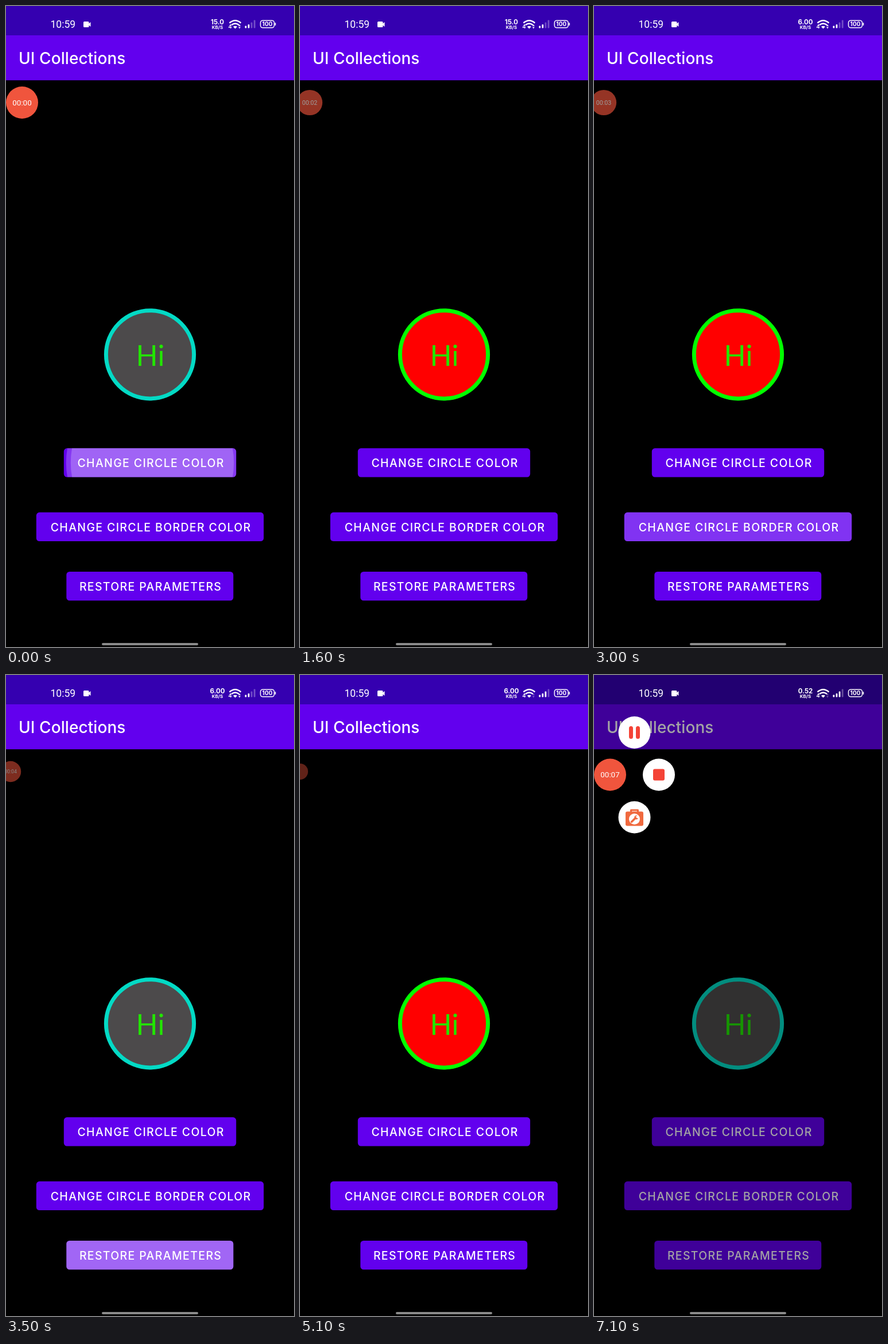
Write an HTML page that moves like this. It is 502 px wide and 1115 px high and loops after 7.2 s.

```html
<!DOCTYPE html>
<html lang="en">
<head>
<meta charset="utf-8">
<title>UI Collections</title>
<style>
  html, body { margin: 0; width: 100%; height: 100%; overflow: hidden; background: #000; }
  svg { display: block; width: 100%; height: 100%; }
  text { fill: #fff; font-family: Roboto, sans-serif; }
  .mid { text-anchor: middle; }
  .title { font: 500 28px Inter, sans-serif; letter-spacing: .08px; }
  .label { font: 500 19.5px Inter, sans-serif; letter-spacing: 1.35px; text-anchor: middle; }
  .hi { font: 400 50px Lato, sans-serif; fill: #22e600; text-anchor: middle; }
  .bold { font-family: Inter, sans-serif; font-weight: 700; text-anchor: middle; }
  .line { fill: none; stroke: #fff; }
</style>
</head>
<body>
<svg viewBox="0 0 502 1115">
  <rect width="502" height="1115"/>
  <rect width="502" height="51" fill="#3500b0"/>
  <rect y="51" width="502" height="78.2" fill="#6200ee"/>
  <text class="title" x="22" y="101">UI Collections</text>

  <circle id="disc" cx="251" cy="606.3" r="76.6" stroke-width="7"/>
  <text class="hi" x="251.5" y="626">Hi</text>
  <g id="buttons"></g>

  <rect id="dim" width="502" height="1115" opacity="0"/>

  <g id="status" fill="#fff">
    <text x="77.5" y="38" font-size="17.5">10:59</text>
    <path d="M136.5 27h6.500q1.500 0 1.500 1.500v2l3-2.500v8l-3-2.500v2q0 1.500-1.500 1.500h-6.500q-1.500 0-1.500-1.500v-7q0-1.500 1.500-1.500z"/>
    <text id="speed" class="bold" x="368.5" y="32" font-size="11.5"></text>
    <text class="bold" x="368.5" y="40" font-size="8">KB/S</text>
    <text class="bold" x="390.5" y="39" font-size="9">4</text>
    <path class="line" stroke-width="2.3" d="M389.5 29.500q10-8.500 20 0M393 33q6.500-5 13 0"/>
    <path d="M396 36q3.500-2.500 7 0l-3.500 3.500z"/>
    <path id="arrows" d="M405 35l2-3 2 3zM405 36.500h4l-2 3z"/>
    <g id="bars">
      <rect x="416.5" y="34.5" width="2.8" height="4" rx="1"/>
      <rect x="421.6" y="32" width="2.8" height="6.5" rx="1"/>
      <rect x="426.7" y="28.5" width="2.8" height="10" rx="1"/>
      <rect x="431.8" y="24.5" width="2.8" height="14" rx="1"/>
    </g>
    <rect class="line" x="443.5" y="25.2" width="24" height="12.6" rx="4" stroke-width="1.5"/>
    <rect x="468.5" y="29" width="1.8" height="5" rx=".9"/>
    <text class="bold" x="455.5" y="35.2" font-size="10">100</text>
  </g>

  <g id="menu">
    <g>
      <circle r="28" fill="#fff"/>
      <path d="M-6-7.500v15M6-7.500v15" stroke="#f44336" stroke-width="7" stroke-linecap="round"/>
    </g>
    <g>
      <circle r="28" fill="#fff"/>
      <rect x="-10" y="-10" width="20" height="20" rx="3" fill="#f44336"/>
    </g>
    <g>
      <circle r="28" fill="#fff"/>
      <path d="M-6-9v-3.500h12v3.500" fill="none" stroke="#f0693e" stroke-width="3" stroke-linejoin="round"/>
      <rect x="-15.5" y="-10" width="31" height="25" rx="3" fill="#f0693e"/>
      <circle cy="3" r="9.5" fill="#fff"/>
      <path d="M-5 8L2 1" stroke="#f0693e" stroke-width="3.5" stroke-linecap="round"/>
      <path d="M5.500-2.500A3.500 3.500 0 1 0 6.500 1.500L3 1.500L2-1.500z" fill="#f0693e"/>
    </g>
  </g>

  <g id="badge">
    <circle r="28" fill="#f0553d"/>
    <text id="timer" class="mid" y="4.7" font-size="13.4"></text>
  </g>
  <rect x="167" y="1108" width="168" height="4" rx="2" fill="#8a8a8a"/>
</svg>
<script>
const LOOP = 7200, STEP = 100;
const COLOR = 0, BORDER = 1, RESTORE = 2;
const $ = id => document.getElementById(id);
const set = (el, attrs) => { for (const k in attrs) el.setAttribute(k, attrs[k]); };

// label, left, top, width, text centre
const BUTTONS = [
  ['CHANGE CIRCLE COLOR', 100.8, 769.3, 300.4, 252.6],
  ['CHANGE CIRCLE BORDER COLOR', 52.8, 880.8, 396.4, 252.6],
  ['RESTORE PARAMETERS', 105.3, 984, 291, 252.1]
];
const HEIGHT = 50.3;
// button, touch time, end of highlight
const PRESSES = [
  [COLOR, 0, 200], [BORDER, 1100, 1600], [RESTORE, 2200, 2500],
  [COLOR, 2400, 2700], [BORDER, 2700, 3100], [RESTORE, 3200, 3700],
  [COLOR, 4100, 4500], [BORDER, 4600, 5100], [RESTORE, 5200, 5500]
];
// time, x, y, scale, opacity
const BADGE = [
  [0, 28, 168, 1, 1], [100, 22.5, 168, .9, .8], [200, 17, 168, .79, .62],
  [3500, 8, 168, .65, .52], [3600, 0, 168, .5, .4],
  [6700, 28, 171, 1, 1], [6800, 28, 173.5, 1, 1]
];
const MENU = [[70.5, 100], [113, 173.5], [70.5, 247.5]];

$('buttons').innerHTML = BUTTONS.map(([label, x, y, w, mid], i) => {
  const shape = `<rect x="${x}" y="${y}" width="${w}" height="${HEIGHT}" rx="5.5"`;
  const ring = r => `<circle cx="${x + w / 2 + 4}" cy="${y + HEIGHT / 2}" r="${r}"/>`;
  return `<clipPath id="clip${i}">${shape}/></clipPath>${shape} fill="#6200ee"/>
    ${shape} class="glow" fill="#fff" opacity="0"/>
    <g class="ripple" clip-path="url(#clip${i})" fill="#fff" fill-opacity=".22">${ring(w / 2)}${ring(w / 2 - 8)}</g>
    <text class="label" x="${mid}" y="${y + 32.8}">${label}</text>`;
}).join('');
const glows = document.querySelectorAll('.glow');
const ripples = document.querySelectorAll('.ripple');

function drawPresses(t) {
  const glow = [0, 0, 0], touched = [false, false, false];
  let fill = '#4c4a4b', stroke = '#03dac5';
  for (const [button, start, end] of PRESSES) {
    if (t < start) break;
    if (t === start) touched[button] = true;
    else if (t < end) glow[button] = t < end - STEP ? .4 : .2;
    if (t > start) {
      if (button === COLOR) fill = '#f00';
      else if (button === BORDER) stroke = '#0f0';
      else { fill = '#4c4a4b'; stroke = '#03dac5'; }
    }
  }
  glows.forEach((el, i) => set(el, { opacity: glow[i] }));
  ripples.forEach((el, i) => set(el, { visibility: touched[i] ? 'visible' : 'hidden' }));
  set($('disc'), { fill, stroke });
}

function drawOverlay(t) {
  const [, x, y, scale, opacity] = BADGE.filter(b => b[0] <= t).pop();
  set($('badge'), { transform: `translate(${x} ${y}) scale(${scale})`, opacity });
  $('timer').textContent = '00:0' + Math.floor((t + 600) / 1000);
  set($('timer'), { visibility: scale > .5 ? 'visible' : 'hidden' });

  const open = t < 6700 ? 0 : t < 6800 ? .5 : 1;
  set($('dim'), { opacity: .355 * open });
  set($('menu'), { visibility: open ? 'visible' : 'hidden' });
  [...$('menu').children].forEach((item, i) => {
    const [mx, my] = MENU[i];
    set(item, { transform: `translate(${x + (mx - x) * open} ${y + (my - y) * open}) scale(${open})` });
  });
}

function drawStatus(t) {
  $('speed').textContent = t < 2400 ? '15.0' : t < 7100 ? '6.00' : '0.52';
  const level = t < 4900 ? 2 : 3;
  [...$('bars').children].forEach((bar, i) => set(bar, { opacity: i < level ? 1 : .3 }));
  set($('arrows'), { opacity: t < 4900 ? 1 : .35 });
}

const begin = performance.now();
function frame() {
  const elapsed = (performance.now() - begin) % LOOP;
  const t = Math.floor(elapsed / STEP) * STEP;
  drawPresses(t);
  drawOverlay(t);
  drawStatus(t);
  requestAnimationFrame(frame);
}
frame();
</script>
</body>
</html>
```
